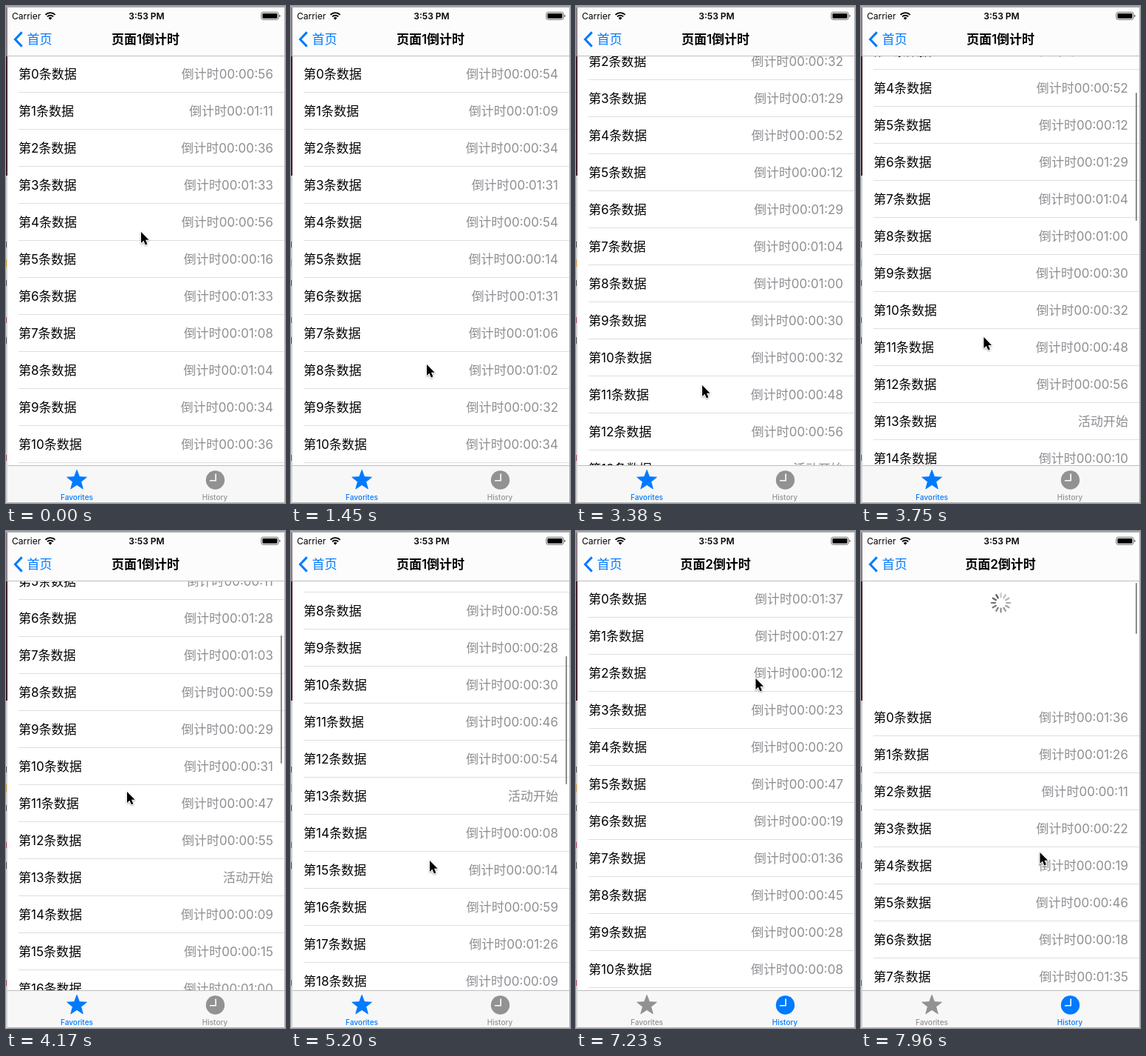
An HTML page for the animation above (8000 ms loop, 378 by 671 pixels).

```html
<!DOCTYPE html>
<html lang="zh-CN">
<head>
<meta charset="utf-8">
<title>倒计时</title>
<style>
  html, body { margin: 0; width: 100%; height: 100%; overflow: hidden; background: #fff; }
  body { font: 17px Inter, "Noto Sans CJK SC", "Noto Sans CJK", sans-serif; color: #000; }
  #stage { position: absolute; left: 0; top: 0; width: 378px; height: 671px; overflow: hidden; background: #fff; }
  #stage > *, #rows, .row span { position: absolute; }
  #list { left: 2px; top: 68px; width: 375px; height: 552px; overflow: hidden; background: #fff; }
  #rows { left: 0; top: -1px; width: 100%; }
  .row { position: relative; height: 50px; line-height: 50px; white-space: nowrap; }
  .row::after { content: ""; position: absolute; left: 15px; right: 0; bottom: 0; height: 1px; background: #dedee0; }
  .name { left: 15px; }
  .time { right: 15px; color: #8e8e93; }
  #nav { left: 2px; top: 2px; width: 375px; height: 65px; background: #fcfcfc; border-bottom: 1px solid #bdbdbf; }
  #tabs { left: 2px; top: 620px; width: 375px; height: 50px; background: #f7f7f7; border-top: 1px solid #bdbdbf; box-sizing: border-box; }
  .mid { transform: translate(-50%, -50%); white-space: nowrap; line-height: 20px; }
  #title { left: 189px; top: 45px; font-weight: 600; }
  #back { left: 45.5px; top: 45px; color: #007aff; }
  #carrier { left: 8px; top: 3.5px; font-size: 12px; line-height: 20px; }
  #clock { left: 190.5px; top: 13.5px; font-size: 12px; font-weight: 600; }
  .tab { top: 663px; font-size: 10px; font-weight: 500; color: var(--c); }
  #bar { left: 371.5px; width: 2.5px; border-radius: 2px; background: #8b8b8d; }
  #art { left: 0; top: 0; }
  .icon { fill: var(--c); }
</style>
</head>
<body>
<div id="stage">
  <div id="list"><div id="rows"></div></div>
  <div id="nav"></div>
  <div id="tabs"></div>
  <div id="carrier">Carrier</div>
  <div id="clock" class="mid">3:53 PM</div>
  <div id="back" class="mid">首页</div>
  <div id="title" class="mid"></div>
  <div class="tab mid" style="left:96px">Favorites</div>
  <div class="tab mid" style="left:283px">History</div>
  <div id="bar"></div>
  <svg id="art" width="378" height="671" viewBox="0 0 378 671">
    <!-- desktop showing around the window -->
    <path fill="#a9a7aa" d="M0 0H378V2H0z"/>
    <path fill="#b4b4b6" d="M377 2h1v669h-1zM0 670h378v1H0z"/>
    <path fill="#8d8089" d="M0 2h2v66H0z"/>
    <path fill="#43222b" d="M0 68h2v161H0z"/>
    <path fill="#d4d4d6" d="M0 229h2v442H0z"/>
    <path fill="#555" d="M0 318h1v8H0zM0 370h1v8H0zM0 447h1v9H0z"/>
    <path fill="#d99a3c" d="M0 342h1v10H0z"/>
    <path fill="#b8485a" d="M0 420h1v8H0zM0 606h1v8H0z"/>
    <!-- status bar -->
    <g fill="none" stroke="#000" stroke-width="1.9">
      <path d="M53.4 11.9a9.2 9.2 0 0 1 13.2 0M55.9 14.4a5.8 5.8 0 0 1 8.2 0"/>
    </g>
    <path d="M57.6 16.2a3.5 3.5 0 0 1 4.8 0L60 18.7z"/>
    <rect x="345.9" y="8.4" width="23.2" height="9.9" rx="2.4" fill="#fff" stroke="#666"/>
    <rect x="347.5" y="10" width="20" height="6.7" rx="1.2"/>
    <path fill="#666" d="M370.2 11.7q1.6 .4 1.6 1.7t-1.6 1.7z"/>
    <path d="M21.6 35.4L12.4 45l9.2 9.6" fill="none" stroke="#007aff" stroke-width="3"/>
    <!-- tab icons -->
    <path id="star" class="icon tab-icon" stroke="var(--c)" stroke-linejoin="round"/>
    <g class="tab-icon">
      <circle class="icon" cx="283.5" cy="640" r="12.7"/>
      <path d="M284.2 631.5V640.8H276" fill="none" stroke="#fff" stroke-width="1.6"/>
    </g>
    <g id="spin" stroke="#4a4a50" stroke-width="2.2" stroke-linecap="round"></g>
    <g id="cursor">
      <path d="M0 0V15L3.4 11.8L5.9 17.4L8.4 16.3L6 10.8H10.6z" fill="#000" stroke="#fff" stroke-width="1.8"
        stroke-linejoin="round" paint-order="stroke" style="filter:drop-shadow(0 1px 1px #0005)"/>
    </g>
  </svg>
</div>
<script>
const LOOP = 8000, SWITCH = 5760;
const $ = id => document.getElementById(id);

// Starting seconds per row; a negative value has already expired.
const pages = [
  { left: [56, 71, 36, 93, 56, 16, 93, 68, 64, 34, 36, 52, 60, -1, 14, 20, 65, 92, 15, 41], firstTick: 30 },
  { left: [99, 89, 14, 25, 22, 49, 21, 98, 47, 30, 10, 55], firstTick: 5870 }
];

// Smooth monotone curve through [time, value] points.
function track(points) {
  const n = points.length;
  const slope = i => (points[i + 1][1] - points[i][1]) / (points[i + 1][0] - points[i][0]);
  const tangent = points.map((p, i) => {
    if (i === 0 || i === n - 1) return 0;
    const a = slope(i - 1), b = slope(i);
    return a * b <= 0 ? 0 : 2 * a * b / (a + b);
  });
  return t => {
    if (t <= points[0][0]) return points[0][1];
    if (t >= points[n - 1][0]) return points[n - 1][1];
    let i = 0;
    while (t >= points[i + 1][0]) i++;
    const [t0, v0] = points[i], [t1, v1] = points[i + 1];
    const h = t1 - t0, u = (t - t0) / h, w = 1 - u;
    return v0 * (1 + 2 * u) * w * w + tangent[i] * h * u * w * w
         + v1 * u * u * (3 - 2 * u) - tangent[i + 1] * h * u * u * w;
  };
}

const scroll = [
  track([[1680, 0], [1950, 14], [2270, 53], [2450, 88], [2650, 110], [2900, 117], [3390, 117], [3700, 170],
         [4000, 242], [4170, 274], [4350, 317], [4600, 359], [5030, 384]]),
  track([[7280, 0], [7480, -32], [7650, -78], [7800, -134], [7960, -160]])
];
const barAlpha = track([[1680, 0], [1740, 1], [2900, 1], [3200, 0], [3385, 0], [3450, 1], [5250, 1], [5550, 0],
                        [7290, 0], [7360, 1]]);
const path = [
  [30, 183, 305], [400, 173, 372], [770, 180, 402], [970, 180, 402], [1450, 184, 484], [1680, 184, 484],
  [1950, 180, 466], [2270, 177, 424], [2450, 175, 392], [2600, 174, 382], [3230, 171, 512], [3380, 171, 512],
  [3700, 167, 458], [4000, 164, 386], [4170, 164, 352], [4330, 166, 336], [4970, 188, 445], [5200, 188, 445],
  [5270, 184, 456], [5580, 282, 642], [6130, 282, 642], [6200, 232, 610], [6460, 232, 610], [6750, 225, 420],
  [7230, 243.5, 199], [7280, 243.5, 199], [7480, 243, 262], [7650, 242, 336], [7800, 242, 398], [7960, 242.5, 434]
];
const cursorX = track(path.map(p => [p[0], p[1]]));
const cursorY = track(path.map(p => [p[0], p[2]]));

const polar = (r, deg) => [r * Math.sin(deg * Math.PI / 180), -r * Math.cos(deg * Math.PI / 180)];

$('star').setAttribute('d', 'M' + Array.from({ length: 10 }, (_, i) => {
  const [x, y] = polar(i % 2 ? 5.9 : 14, i * 36);
  return (96 + x).toFixed(2) + ' ' + (640.5 + y).toFixed(2);
}).join('L') + 'z');

const spokes = Array.from({ length: 12 }, (_, i) => {
  const line = document.createElementNS('http://www.w3.org/2000/svg', 'line');
  [[7.6, 1], [12.6, 2]].forEach(([r, k]) => {
    const [x, y] = polar(r, i * 30);
    line.setAttribute('x' + k, x);
    line.setAttribute('y' + k, y);
  });
  return $('spin').appendChild(line);
});

const rows = pages[0].left.map((_, i) => {
  const row = document.createElement('div');
  row.className = 'row';
  row.innerHTML = `<span class="name">第${i}条数据</span><span class="time"></span>`;
  $('rows').append(row);
  return row;
});

const two = n => String(n).padStart(2, '0');
const countdown = s => s <= 0 ? '活动开始' : `倒计时00:${two(Math.floor(s / 60))}:${two(s % 60)}`;

let shown = '';
function fill(page, ticks) {
  const key = page + ':' + ticks;
  if (key === shown) return;
  shown = key;
  const { left } = pages[page];
  rows.forEach((row, i) => {
    row.hidden = i >= left.length;
    if (!row.hidden) row.lastChild.textContent = countdown(left[i] - ticks);
  });
  $('title').textContent = `页面${page + 1}倒计时`;
  for (const set of ['.tab', '.tab-icon'])
    document.querySelectorAll(set + ':not(div.tab-icon)').forEach((el, i) =>
      el.style.setProperty('--c', i === page ? '#007aff' : '#929292'));
}

function drawSpinner(t, pull) {
  const armed = pull > 95;
  const count = Math.min(12, Math.max(0, Math.floor((pull - 25) / 70 * 12)));
  const head = Math.floor(t / 83);
  $('spin').setAttribute('transform', `translate(189.5 ${67 + Math.min(30, pull / 2)})`);
  spokes.forEach((s, i) => {
    const age = ((head - i) % 12 + 12) % 12;
    s.setAttribute('opacity', armed ? 0.9 - 0.055 * age : i < count ? 0.6 : 0);
  });
}

function draw(t) {
  const page = t < SWITCH ? 0 : 1;
  const ticks = Math.max(0, Math.floor((t - pages[page].firstTick) / 1000) + 1);
  fill(page, ticks);

  const y = Math.round(scroll[page](t)), pull = Math.max(0, -y);
  $('rows').style.transform = `translateY(${-y}px)`;
  drawSpinner(t, pull);

  const bar = $('bar').style;
  bar.opacity = barAlpha(t);
  bar.top = 70.3 + Math.max(0, y) * 0.257 + 'px';
  bar.height = 173 - pull * 0.65 + 'px';

  $('cursor').setAttribute('transform', `translate(${cursorX(t).toFixed(1)} ${cursorY(t).toFixed(1)})`);
}

const start = performance.now();
function frame(now) {
  draw(Math.max(0, now - start) % LOOP);
  requestAnimationFrame(frame);
}
draw(0);
requestAnimationFrame(frame);
</script>
</body>
</html>
```
